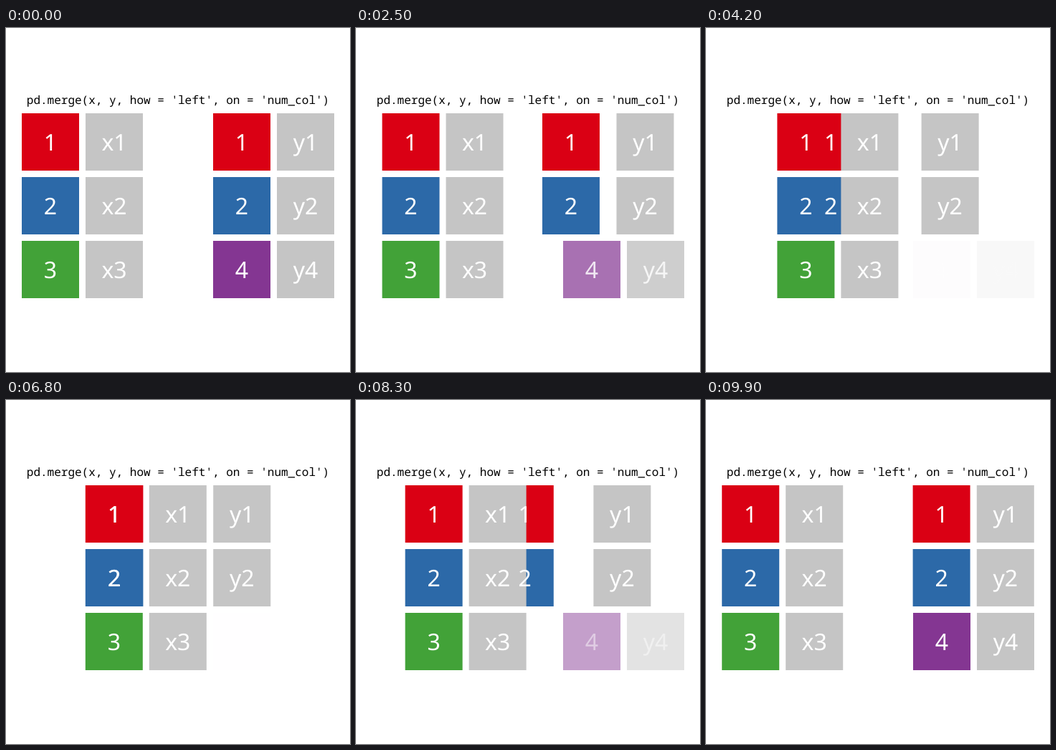
Recreate the animation shown at these times as an HTML page. Size 480 by 480 pixels, loop 10000 ms.

```html
<!DOCTYPE html>
<html lang="en">
<head>
<meta charset="utf-8">
<title>Left join</title>
<style>
  html, body { margin: 0; width: 100%; height: 100%; overflow: hidden; background: #fff; }
  svg { display: block; width: 100%; height: 100%; }
  text { text-anchor: middle; text-rendering: geometricPrecision; }
  .code { font: 16px "Noto Sans Mono", "DejaVu Sans Mono", monospace; white-space: pre; }
  .label { font: 32px "Noto Sans", "Open Sans", sans-serif; fill: #fff; }
</style>
</head>
<body>
<svg id="stage" viewBox="0 0 480 480">
  <text class="code" x="240" y="106">pd.merge(x, y, how = 'left', on = 'num_col')</text>
  <g id="tiles"></g>
  <g id="labels"></g>
</svg>
<script>
const LOOP = 10000, STEP = 100;
const SIZE = 80, PITCH = 89, TOP = 119, BASELINE = 52;
const RED = '#da0014', BLUE = '#2c69a8', GREEN = '#42a238', PURPLE = '#843692', GREY = '#c5c5c5';

// label, row, start x, travel in x, colour, fades
const CELLS = [
  ['1', 0, 289, -2 * PITCH, RED],
  ['2', 1, 289, -2 * PITCH, BLUE],
  ['1', 0, 22, PITCH, RED],
  ['2', 1, 22, PITCH, BLUE],
  ['3', 2, 22, PITCH, GREEN],
  ['x1', 0, 111, PITCH, GREY],
  ['x2', 1, 111, PITCH, GREY],
  ['x3', 2, 111, PITCH, GREY],
  ['y1', 0, 378, -PITCH, GREY],
  ['y2', 1, 378, -PITCH, GREY],
  ['4', 2, 289, 0, PURPLE, true],
  ['y4', 2, 378, 0, GREY, true]
];

function add(parent, tag, attrs) {
  const node = document.createElementNS('http://www.w3.org/2000/svg', tag);
  for (const key in attrs) node.setAttribute(key, attrs[key]);
  return document.getElementById(parent).appendChild(node);
}

const cells = CELLS.map(([label, row, x, dx, fill, fades]) => {
  const y = TOP + row * PITCH;
  const tile = add('tiles', 'rect', { x, y, width: SIZE, height: SIZE, fill });
  const text = add('labels', 'text', { class: 'label', x: x + SIZE / 2, y: y + BASELINE });
  text.textContent = label;
  return { tile, text, x, dx, fades, tinted: fill === PURPLE };
});

function ease(t, start, end) {
  const s = Math.min(1, Math.max(0, (t - start) / (end - start)));
  return (1 - Math.cos(Math.PI * s)) / 2;
}

function draw(time) {
  const t = Math.floor((time % LOOP) / STEP) * STEP;
  const leaving = t < 5000;
  const p = leaving ? ease(t, 1600, 5000) : 1 - ease(t, 6700, LOOP);
  const alpha = 1 - p;

  for (const c of cells) {
    const x = c.x + c.dx * p;
    c.tile.setAttribute('x', x);
    c.text.setAttribute('x', x + SIZE / 2);
    if (c.fades) {
      // the purple tile also bleaches to white on its way out
      c.tile.setAttribute('opacity', c.tinted && leaving ? alpha * alpha : alpha);
      c.text.setAttribute('opacity', alpha);
    }
  }
}

const began = performance.now();
function tick() {
  draw(performance.now() - began);
  requestAnimationFrame(tick);
}
draw(0);
requestAnimationFrame(tick);
</script>
</body>
</html>
```
